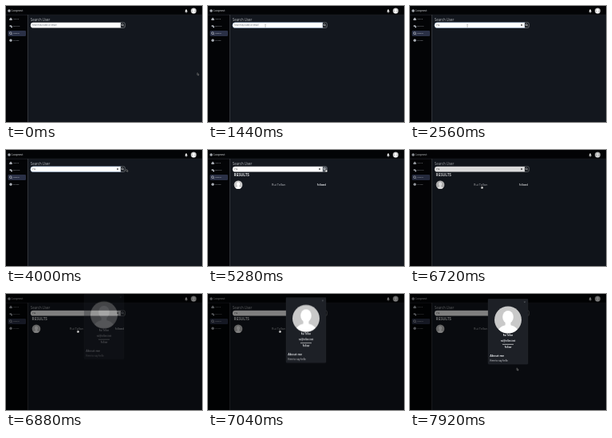
Animation of 246 by 146 pixels, one loop 8 s. Source, as an HTML page:

```html
<!DOCTYPE html>
<html lang="en">
<head>
<meta charset="utf-8">
<title>User search</title>
<style>
html, body { margin: 0; width: 100%; height: 100%; overflow: hidden; background: #030406; }
svg { display: block; width: 100%; height: 100%; }
text { font-family: "Open Sans", "Noto Sans", sans-serif; fill: #e4e6e9; }
.mid { text-anchor: middle; }
.bold { font-weight: 700; }
.nav text { font-size: 2.5px; fill: #a9adb4; }

/* 1% = 80 ms */
.step { animation: 8s step-end infinite; }
.hint { animation-name: hint; }
.first { animation-name: first; }
.second { animation-name: second; }
.focus { animation-name: focus; }
.caret { animation-name: caret; }
.press { animation-name: press; }
.results { animation-name: results; }
.arrow { animation-name: arrow; }
.beam { animation-name: beam; }
.hand { animation-name: hand; }
.shade { animation: shade 8s linear infinite; }
.modal { animation: fade 8s linear infinite, drop 8s ease-out infinite; }
.pointer { animation: travel 8s ease-in-out infinite; }

@keyframes hint { 0% { opacity: 1 } 27.95%, 100% { opacity: 0 } }
@keyframes first { 0% { opacity: 0 } 27.95%, 100% { opacity: 1 } }
@keyframes second { 0% { opacity: 0 } 31.95%, 100% { opacity: 1 } }
@keyframes focus { 0% { opacity: 0 } 17.9% { opacity: .7 } 61.9%, 100% { opacity: 0 } }
@keyframes caret { 0% { opacity: 0 } 18.9% { opacity: 1 } 22.9% { opacity: 0 } 27.9%, 100% { opacity: 0 } }
@keyframes press { 0% { opacity: 0 } 59.9% { opacity: 1 } 71.9%, 100% { opacity: 0 } }
@keyframes results { 0% { opacity: 0 } 65.95%, 100% { opacity: 1 } }
@keyframes arrow { 0% { opacity: 1 } 16.9% { opacity: 0 } 49.9% { opacity: 1 } 58.9% { opacity: 0 } 72.9% { opacity: 1 } 78.9% { opacity: 0 } 92%, 100% { opacity: 1 } }
@keyframes beam { 0% { opacity: 0 } 16.9% { opacity: 1 } 49.9%, 100% { opacity: 0 } }
@keyframes hand { 0% { opacity: 0 } 58.9% { opacity: 1 } 72.9% { opacity: 0 } 78.9% { opacity: 1 } 92%, 100% { opacity: 0 } }
@keyframes shade { 0%, 83.2% { opacity: 0 } 86%, 100% { opacity: .5 } }
@keyframes fade { 0%, 85.4% { opacity: 0 } 87.4%, 100% { opacity: 1 } }
@keyframes drop { 0%, 85.4% { transform: translateY(-8px) } 89.8%, 100% { transform: none } }
@keyframes travel {
  0%, 1% { transform: translate(240px, 84px) }
  6%, 8% { transform: translate(108px, 66px) }
  17.8%, 42% { transform: translate(72px, 24px) }
  50%, 56% { transform: translate(151px, 24px) }
  60%, 71% { transform: translate(148px, 24px) }
  76% { transform: translate(104px, 51px) }
  80%, 91% { transform: translate(90px, 45px) }
  99%, 100% { transform: translate(134px, 93px) }
}
</style>
</head>
<body>
<svg viewBox="0 0 246 146" preserveAspectRatio="none">
  <defs>
    <clipPath id="round"><circle r="10"/></clipPath>
    <g id="person">
      <circle r="10" fill="#c9c9c9"/>
      <g clip-path="url(#round)" fill="#fff">
        <ellipse cy="-2" rx="4" ry="4.8"/>
        <path d="M-2 1H2V4Q7 5 8 10H-8Q-7 5 -2 4Z"/>
      </g>
    </g>
  </defs>

  <rect width="246" height="146" fill="#030406"/>
  <rect x="27.5" y="11.5" width="218.5" height="134.5" fill="#13171e"/>
  <path d="M0 11.2H246" stroke="#2a2d33" stroke-width=".6"/>
  <path d="M27.4 11V146" stroke="#4a4d52" stroke-width=".7"/>

  <circle cx="4" cy="6" r="1.8" fill="#a4a8ae"/>
  <text x="7" y="7.1" font-size="3.3">Loopnest</text>
  <path d="M224.5 7.4Q225.2 6.7 225.2 5.6Q225.3 4.3 226.2 4.3Q227.1 4.3 227.2 5.6Q227.2 6.7 227.9 7.4ZM225.7 7.8H226.7V8.4H225.7Z" fill="#eee"/>
  <use href="#person" transform="translate(235.5 6) scale(.35)"/>

  <rect x="2.5" y="31" width="22.5" height="7" rx="1.2" fill="#2a3046"/>
  <g class="nav">
    <path d="M4.3 16.2L6 14.6L7.7 16.2V18H4.3Z" fill="#a9adb4"/>
    <text x="9" y="17.2">Home</text>
    <path d="M4.5 24.2H7V26H4.5ZM6 25.5H8V27.2H6Z" fill="#a9adb4"/>
    <text x="8.6" y="26.3">Explore</text>
    <g fill="none" stroke="#d5d8dd" stroke-width=".6"><circle cx="5.8" cy="34.2" r="1.4"/><path d="M6.8 35.2L7.8 36.2"/></g>
    <text x="9" y="35.4" style="fill:#d5d8dd">Search</text>
    <circle cx="6" cy="43.3" r="1.7" fill="#a9adb4"/>
    <text x="9" y="44.3">Profile</text>
  </g>

  <text x="30.8" y="18.8" font-size="4.4" style="fill:#b5b8bd">Search User</text>
  <path d="M144 20.8H34.2A3.3 3.3 0 0 0 34.2 27.5H144Z" fill="#fff"/>
  <path class="step focus" d="M144 20.8H34.2A3.3 3.3 0 0 0 34.2 27.5H144Z" fill="none" stroke="#a9cbf5" stroke-width=".6"/>
  <text class="step hint" x="33" y="25.1" font-size="2.65" style="fill:#596069">Search by name or email</text>
  <g font-size="3">
    <text class="step first" x="33.6" y="25.2" style="fill:#222">r</text>
    <text class="step second" x="35.2" y="25.2" style="fill:#222">u</text>
  </g>
  <path class="step first" d="M139.2 23.1L141 24.9M141 23.1L139.2 24.9" stroke="#222" stroke-width=".7"/>
  <path class="step caret" d="M33.4 22.8V25.8" stroke="#222" stroke-width=".4"/>
  <path d="M144 20.8H147.6Q149.4 20.8 149.4 22.5V25.8Q149.4 27.5 147.6 27.5H144Z" fill="#10141a" stroke="#a4a8ad" stroke-width=".5"/>
  <path class="step press" d="M144 20.8H147.6Q149.4 20.8 149.4 22.5V25.8Q149.4 27.5 147.6 27.5H144Z" fill="#555b63"/>
  <g fill="none" stroke="#fff" stroke-width=".55"><circle cx="146.3" cy="23.8" r="1.1"/><path d="M147.1 24.6L148 25.6"/></g>

  <g class="step results">
    <text class="bold" x="32.6" y="33.2" font-size="4.6">RESULTS</text>
    <use href="#person" transform="translate(38 43.8) scale(.53)"/>
    <text x="80" y="45" font-size="3.9" style="fill:#b9bcc1">Rui Tellan</text>
    <text class="bold" x="137" y="44.8" font-size="2.5">Followed</text>
  </g>

  <rect class="shade" width="246" height="146"/>

  <g class="modal">
    <rect x="98" y="6.2" width="50" height="82" rx=".8" fill="#1d2026" stroke="#30333a" stroke-width=".3"/>
    <path d="M143 9.2L144.8 11M144.8 9.2L143 11" stroke="#777b82" stroke-width=".4"/>
    <use href="#person" transform="translate(123 32.5) scale(1.7)"/>
    <g class="mid">
      <text class="bold" x="123" y="53.1" font-size="2.6">Rui Tellan</text>
      <text class="bold" x="123" y="59.8" font-size="2.5">rui@tellan.test</text>
      <text class="bold" x="123" y="68.2" font-size="2.7">Follow</text>
    </g>
    <path d="M116 63.4H130" stroke="#e4e6e9" stroke-width=".7"/>
    <text class="bold" x="100.3" y="78.8" font-size="3.7">About me</text>
    <text x="100.3" y="85" font-size="2.9">Here to say hello</text>
  </g>

  <g class="pointer" stroke-width=".35">
    <path class="step arrow" d="M0 0V3.1L.8 2.4L1.3 3.5L1.8 3.3L1.3 2.2H2.3Z" fill="#111" stroke="#b8b8b8"/>
    <path class="step beam" d="M-.6 -1H.6M0 -1V2.2M-.6 2.2H.6" fill="none" stroke="#555"/>
    <path class="step hand" d="M-.3 0H.3V1.2L1.8 1.6V2.8L1.2 3.7H-.4L-1.3 2.2L-1 1.8L-.3 2.3Z" fill="#fff" stroke="#111"/>
  </g>
</svg>
</body>
</html>
```
